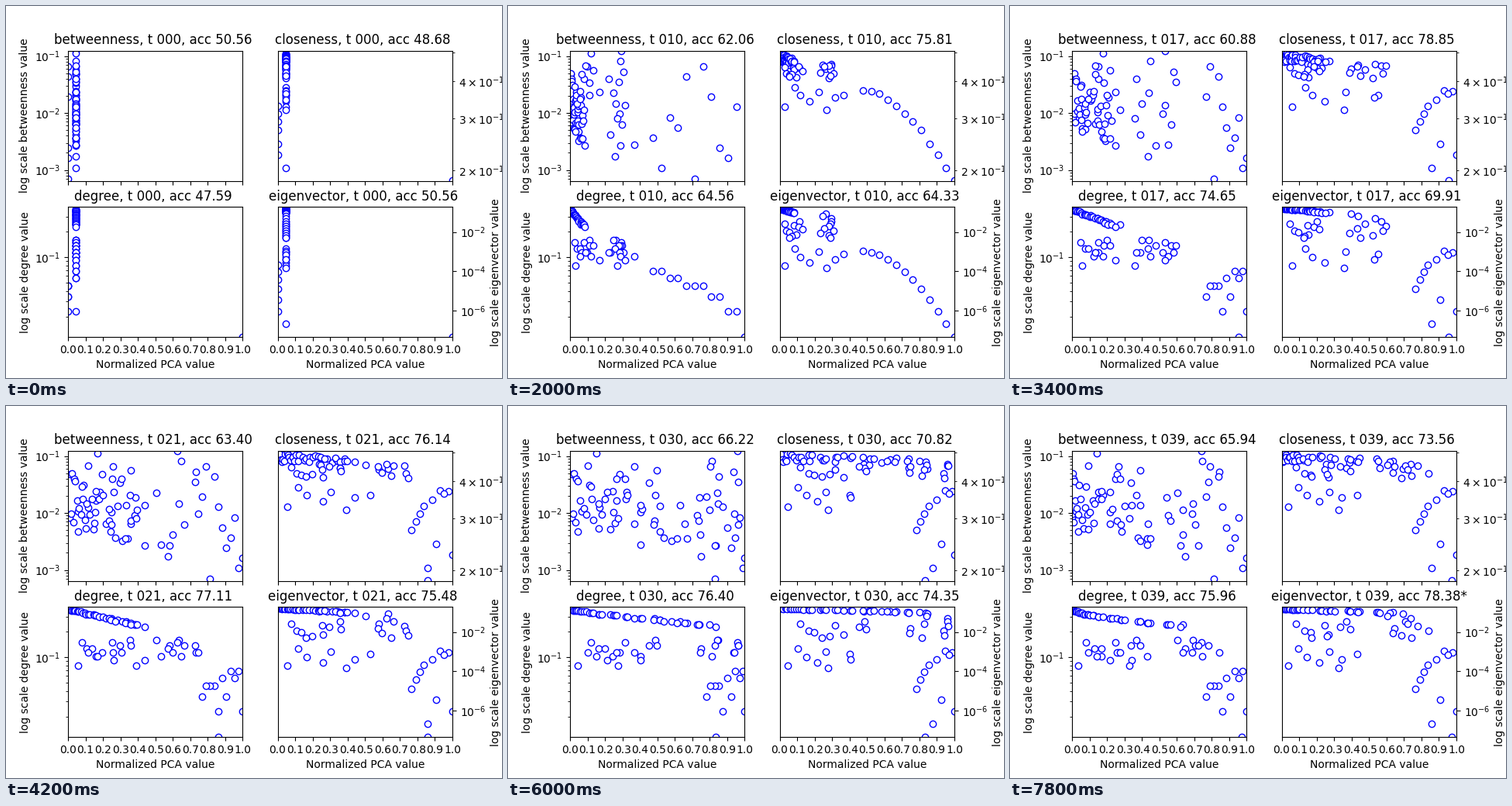
Recreate the animation shown at these times as a matplotlib script. Size 640x480 px, loop 8 s.

```python
import numpy as np
import matplotlib.pyplot as plt
from matplotlib.animation import FuncAnimation

FRAMES, STEP = 40, 200
KEYS = [0, 10, 17, 21, 26, 34, 39]
WIDTH, HEIGHT = 225.0, 168.0    # panel size in pixels
MAX_K = 34.1                    # node degree at the top edge

# name, y limits, accuracy at the key times, steps with a star
PANELS = [
    ("betweenness", (6.446e-4, 0.1246),
     [50.56, 62.06, 60.88, 63.40, 65.85, 67.02, 65.94], {35}),
    ("closeness", (0.1846, 0.507),
     [48.68, 75.81, 78.85, 76.14, 71.65, 70.89, 73.56], set()),
    ("degree", (0.01144, 0.39),
     [47.59, 64.56, 74.65, 77.11, 77.35, 76.14, 75.96], set()),
    ("eigenvector", (4.7e-8, 0.187),
     [50.56, 64.33, 69.91, 75.48, 74.79, 75.40, 78.38], {23, 35, 39}),
]

rng = np.random.default_rng(11)


def spread(low, high, n):
    """Even values in random order."""
    return rng.permutation(np.linspace(low, high, n))


def degree_depth(k):
    k = np.maximum(np.round(k), 1)
    return HEIGHT * np.log(MAX_K / k) / np.log(MAX_K)


def closeness_depth(eig, noise):
    base = np.interp(eig, [2, 9, 27, 40, 57, 77, 168],
                     [8, 20, 22, 36, 50, 75, 168])
    return base + rng.uniform(-noise, noise, len(eig))


def rows(btw, k, eig, xs, noise):
    """Depth below the top edge in each panel, then x at the key times."""
    clo = closeness_depth(eig, noise)
    return np.column_stack([btw, clo, degree_depth(k), eig, xs])


def hubs(n):
    s = 146 * np.linspace(0.05, 1, n) ** 1.45
    v = s / 146
    smooth = v * v * (3 - 2 * v)
    xs = np.column_stack([0.12 * s, 0.37 * s, 0.62 * s, s,
                          200 * smooth, 140 * v ** 1.7])
    xs *= rng.normal(1, 0.06, xs.shape)
    btw = 92 + 0.23 * s - 65 * spread(0, 1, n) ** 1.4
    k = MAX_K * np.exp(-(3 + 0.15 * s) / 47.6)
    eig = 2 + 0.035 * s + rng.uniform(-0.7, 0.7, n)
    return rows(btw, k, eig, xs, 6)


def band(n, s, k, eig, btw, scales):
    """Nodes of similar degree that drift at a shared pace."""
    xs = np.outer(spread(*s, n), scales)
    xs *= rng.normal(1, 0.07, xs.shape)
    return rows(spread(*btw, n), np.linspace(*k, n), np.linspace(*eig, n),
                xs, 4)


def leaves(n):
    q = np.linspace(0, 1, n)
    s = spread(165, 222, n)
    xs = np.outer(s, [0.75, 0.95, 0.97, 1, 1.05, 0.98])
    xs[:, 0] = 107 + 118 * q
    xs[-1] = 225 - 44 * np.sin(np.pi * np.linspace(0, 0.9, 6))
    btw = spread(20, 165, n)
    btw[-1] = 2 * HEIGHT        # zero betweenness lies below the panel
    return rows(btw, 6.2 - 4.9 * q, 57 + 111 * q ** 1.8, xs, 2)


nodes = np.vstack([
    hubs(43),
    band(10, (24, 107), (14, 9), (19, 40), (20, 68),
         (0.27, 0.45, 0.7, 1, 1.15, 0.8)),
    band(11, (155, 215), (14, 9), (9, 40), (0, 136),
         (0.33, 0.56, 0.79, 1, 1.08, 0.83)),
    band(8, (10, 100), (10, 7), (54, 79), (3, 121),
         (0.8, 1.15, 1.1, 1, 0.97, 0.93)),
    leaves(12),
])
depths = nodes[:, :4] / HEIGHT

# All nodes start together, but a few leaves sit on the edges.
start = np.full(len(nodes), 0.045)
start[-8:-2] = 0
start[-1] = 1
paths = np.column_stack([start, np.clip(nodes[:, 4:] / WIDTH, 0, 1)])

steps = np.arange(FRAMES)
track = np.array([np.interp(steps, KEYS, p) for p in paths])
track /= track.max(axis=0)

wobble = rng.uniform(-0.8, 0.8, (len(PANELS), FRAMES))
wobble[:, KEYS] = 0
scores = np.array([np.interp(steps, KEYS, p[2]) for p in PANELS]) + wobble

fig, axes = plt.subplots(2, 2, sharex=True, figsize=(6.4, 4.8), dpi=100)
dots, titles = [], []
for i, (ax, (name, (low, high), _, _)) in enumerate(zip(axes.flat, PANELS)):
    ax.set_yscale("log")
    ax.set_ylim(low, high)
    ax.set_xlim(0, 1)
    ax.set_xticks(np.arange(11) / 10)
    ax.set_ylabel(f"log scale {name} value")
    if i % 2:
        ax.yaxis.tick_right()
        ax.yaxis.set_label_position("right")
    if i >= 2:
        ax.set_xlabel("Normalized PCA value")
    y = high * (low / high) ** depths[:, i]
    dots += ax.plot(track[:, 0], y, "o", mfc="white", mec="blue")
    titles.append(ax.set_title(name))
axes[1, 1].set_yticks([1e-6, 1e-4, 1e-2])
axes[1, 1].minorticks_off()


def update(t):
    for i, (name, _, _, stars) in enumerate(PANELS):
        dots[i].set_xdata(track[:, t])
        mark = "*" if t in stars else " "
        titles[i].set_text(f"{name}, t {t:03d}, acc {scores[i, t]:.2f}{mark}")
    return dots + titles


anim = FuncAnimation(fig, update, frames=FRAMES, interval=STEP,
                     init_func=lambda: update(0), repeat=True, repeat_delay=0)
plt.show()
```
